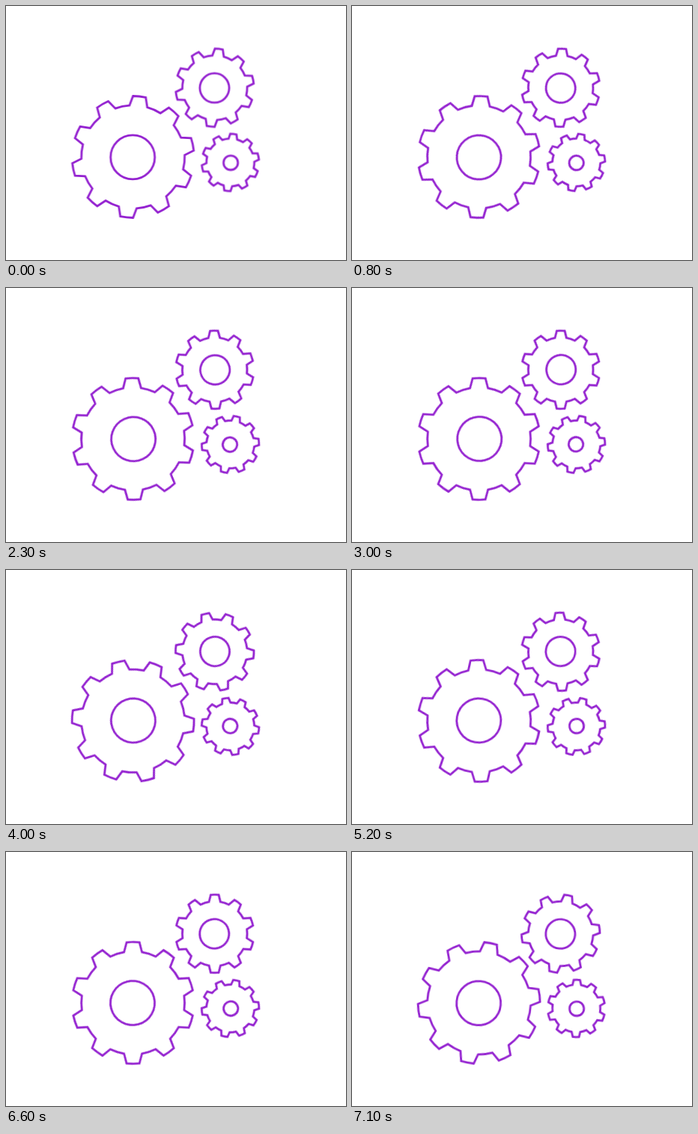
Animation, 454 px wide and 340 px high, one loop 7200 ms. Source, as an HTML page:

```html
<!DOCTYPE html>
<html lang="en">
<head>
<meta charset="utf-8">
<title>Gears</title>
<style>
  html, body { margin: 0; width: 100%; height: 100%; overflow: hidden; background: #fff; }
  svg { display: block; width: 454px; height: 340px; }
  path, circle { fill: none; stroke: #9422d0; stroke-width: 2.8; stroke-linejoin: miter; }
</style>
</head>
<body>
<svg id="stage" viewBox="0 0 454 340"></svg>
<script>
const TEETH = 10;
const PITCH = 360 / TEETH;
const START = 6;
const LOOP = 7200;
const STEPS = 72;

// tip and root are radii; tipHalf and rootHalf are half-angles in degrees.
// ox, oy shift the hole slightly off the axis at the start of the loop.
const gears = [
  { x: 169.6, y: 202, tip: 81.5, root: 69, tipHalf: 6, rootHalf: 10, hole: 29.5, ox: -0.45, oy: 0.4, dir: -1 },
  { x: 278.7, y: 109.4, tip: 52.3, root: 43.3, tipHalf: 5.8, rootHalf: 10.2, hole: 19.6, ox: -0.35, oy: 0.3, dir: -1 },
  { x: 299.6, y: 209.4, tip: 38.3, root: 32, tipHalf: 6.3, rootHalf: 10.3, hole: 9.6, ox: 0.45, oy: 0.4, dir: 1 }
];

function add(parent, tag, attrs) {
  const el = document.createElementNS('http://www.w3.org/2000/svg', tag);
  for (const key in attrs) el.setAttribute(key, attrs[key]);
  return parent.appendChild(el);
}

function polar(r, deg) {
  const a = deg * Math.PI / 180;
  return (r * Math.sin(a)).toFixed(3) + ' ' + (-r * Math.cos(a)).toFixed(3);
}

function outline({ tip, root, tipHalf, rootHalf }) {
  const arc = (r, deg) => `A${r} ${r} 0 0 1 ${polar(r, deg)}`;
  let d = 'M' + polar(root, START - rootHalf);
  for (let i = 0; i < TEETH; i++) {
    const a = START + i * PITCH;
    d += 'L' + polar(tip, a - tipHalf) + arc(tip, a + tipHalf)
       + 'L' + polar(root, a + rootHalf) + arc(root, a + PITCH - rootHalf);
  }
  return d + 'Z';
}

const stage = document.getElementById('stage');
for (const gear of gears) {
  const axis = add(stage, 'g', { transform: `translate(${gear.x} ${gear.y})` });
  const wheel = add(axis, 'g', {});
  wheel.style.transformOrigin = '0 0';
  add(wheel, 'path', { d: outline(gear) });
  add(wheel, 'circle', { cx: gear.ox, cy: gear.oy, r: gear.hole });
  wheel.animate(
    [{ transform: 'rotate(0deg)' }, { transform: `rotate(${gear.dir * 360}deg)` }],
    { duration: LOOP, iterations: Infinity, easing: `steps(${STEPS}, end)` }
  );
}
</script>
</body>
</html>
```
